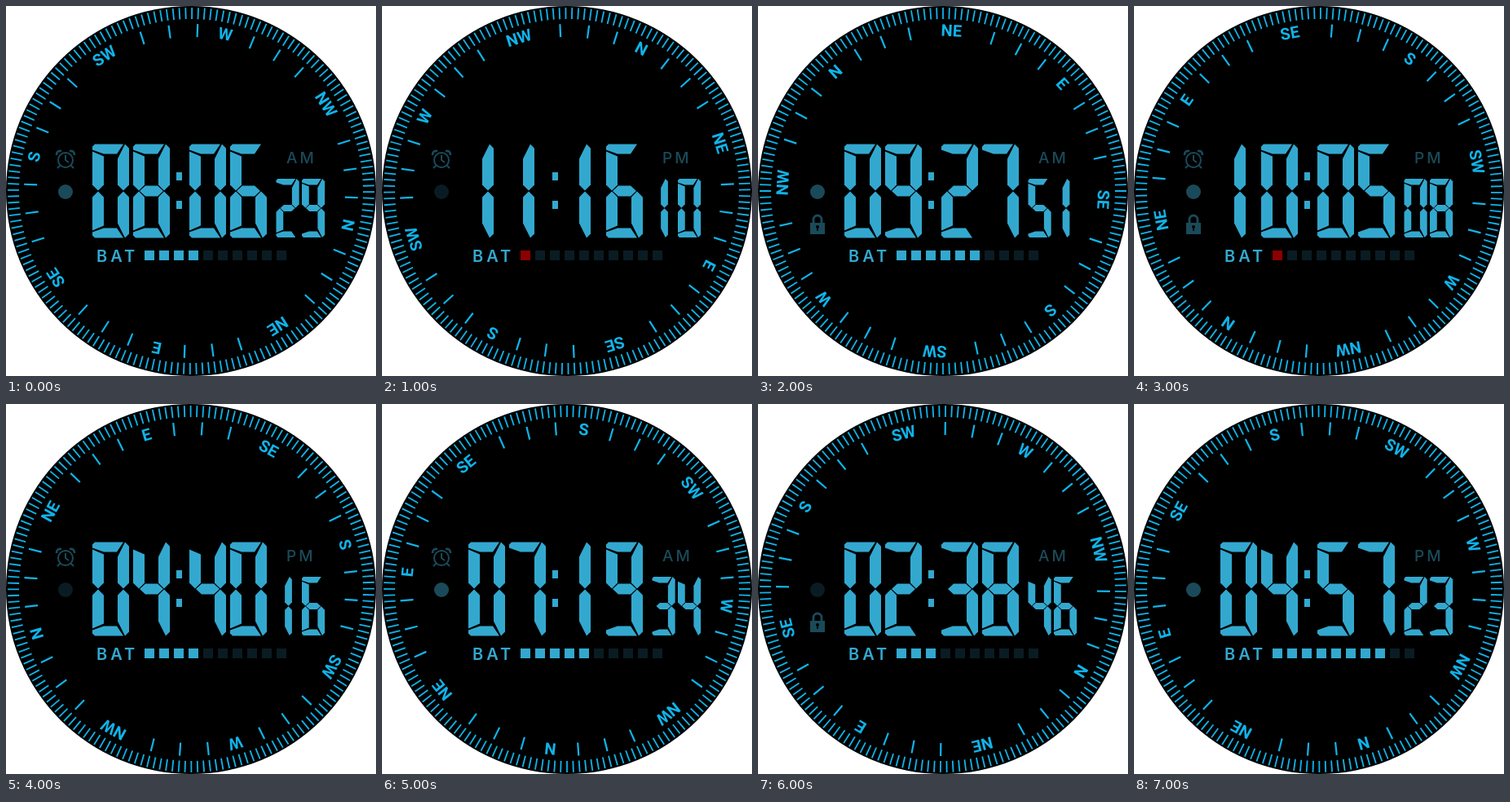
Write an HTML page with a canvas that moves like this. It is 454 by 454 pixels and loops after 8 s.

```html
<!DOCTYPE html>
<html lang="en">
<head>
<meta charset="utf-8">
<title>Digital compass watch</title>
<style>
html, body { margin: 0; height: 100%; overflow: hidden; background: #fff; }
canvas { display: block; }
</style>
</head>
<body>
<canvas id="face" width="454" height="454"></canvas>
<script>
const ctx = document.getElementById('face').getContext('2d');
const CENTER = 227, STEP = 1000;
const DIAL = '#10b4ea', DIGIT = '#33a8cf', DIM = '#0a1c23', ICON = '#1a4a59', RED = '#8b0000';

// One reading per second: time, half of day, north angle, battery, icons
const readings = [
  { time: '080629', half: 'AM', north: 102.3, battery: 4, alarm: 1, radio: 1, lock: 0 },
  { time: '111610', half: 'PM', north: 27.6, battery: 1, alarm: 1, radio: 0, lock: 0 },
  { time: '092751', half: 'AM', north: 318, battery: 6, alarm: 0, radio: 1, lock: 1 },
  { time: '100508', half: 'PM', north: 214.5, battery: 1, alarm: 1, radio: 1, lock: 1 },
  { time: '044016', half: 'PM', north: 253.9, battery: 4, alarm: 1, radio: 0, lock: 0 },
  { time: '071934', half: 'AM', north: 186, battery: 5, alarm: 1, radio: 1, lock: 0 },
  { time: '023846', half: 'AM', north: 120.8, battery: 3, alarm: 0, radio: 0, lock: 1 },
  { time: '045723', half: 'PM', north: 163.9, battery: 8, alarm: 0, radio: 1, lock: 0 }
];

// Segments of a 45 x 115 digit; the lower ones mirror the upper ones
const flip = path => path.replace(/,(\d+)/g, (_, y) => ',' + (115 - y));
const bar = 'M0,7L0,3L3,0L38,0L30,12L14,12Z';
const leftSide = 'M0,9L14,15L14,50L7,57L0,50Z';
const rightSide = 'M40,0L45,5L45,50L38,57L31,50L31,18Z';
const middle = 'M8,57.5L15,51L30,51L37,57.5L30,64L15,64Z';
const segments = {
  a: new Path2D(bar), d: new Path2D(flip(bar)),
  f: new Path2D(leftSide), e: new Path2D(flip(leftSide)),
  b: new Path2D(rightSide), c: new Path2D(flip(rightSide)),
  g: new Path2D(middle)
};
const glyphs = ['abcdef', 'bc', 'abdeg', 'abcdg', 'bcfg', 'acdfg', 'acdefg', 'abc', 'abcdefg', 'abcdfg'];

function digit(value, x, y, scale) {
  ctx.save();
  ctx.translate(x, y);
  ctx.scale(scale, scale);
  if (value === '1') ctx.translate(-14, 0);
  ctx.fillStyle = DIGIT;
  for (const key of glyphs[value]) ctx.fill(segments[key]);
  ctx.restore();
}

function rect(color, x, y, w, h) {
  ctx.fillStyle = color;
  ctx.fillRect(x, y, w, h);
}

function stroke(path, color, width) {
  ctx.strokeStyle = color;
  ctx.lineWidth = width;
  ctx.stroke(new Path2D(path));
}

function disc(color, x, y, r) {
  ctx.fillStyle = color;
  ctx.beginPath();
  ctx.arc(x, y, r, 0, Math.PI * 2);
  ctx.fill();
}

function text(value, x, y, font, color, align, spacing) {
  ctx.font = font;
  ctx.fillStyle = color;
  ctx.textAlign = align;
  ctx.letterSpacing = spacing + 'px';
  ctx.fillText(value, x, y);
}

function around(angle, paint) {
  ctx.save();
  ctx.rotate(angle * Math.PI / 180);
  paint();
  ctx.restore();
}

function dial(north) {
  ctx.save();
  ctx.translate(CENTER, CENTER);
  ctx.rotate(north * Math.PI / 180);
  for (let a = 0; a < 360; a += 2) around(a, () => rect(DIAL, -0.9, -225, 1.8, 14));
  for (let a = 0; a < 360; a += 10) {
    if (![0, 40, 50].includes(a % 90)) around(a, () => rect(DIAL, -1.1, -205, 2.2, 16));
  }
  ['N', 'NE', 'E', 'SE', 'S', 'SW', 'W', 'NW'].forEach((name, i) => around(i * 45, () =>
    text(name, 0, -190, 'bold 20px Roboto, sans-serif', DIAL, 'center', 0)));
  ctx.restore();
}

function alarmIcon() {
  stroke('M82,189a9,9 0 1 1 -18,0a9,9 0 1 1 18,0M73,183V189L77,192M66,196L63,199M80,196L83,199', ICON, 2);
  stroke('M62,183Q62,177 68,178M84,183Q84,177 78,178', ICON, 2.6);
}

function lockIcon() {
  rect(ICON, 64, 266, 18, 14);
  stroke('M68,267V262a5,5 0 0 1 10,0V267', ICON, 2.8);
  disc('#000', 73, 271, 2);
  rect('#000', 72.2, 271, 1.6, 5);
}

function draw({ time, half, north, battery, alarm, radio, lock }) {
  ctx.clearRect(0, 0, 454, 454);
  disc('#000', CENTER, CENTER, 227);
  dial(north);
  [106, 156, 225, 275].forEach((x, i) => digit(time[i], x, 169.5, 1));
  [331.5, 363].forEach((x, i) => digit(time[4 + i], x, 212, 0.626));
  for (const y of [204, 239]) rect(DIGIT, 209, y, 7, 10);
  text(half, 344, 193, '500 19px Inter, sans-serif', ICON, 'left', 3);
  text('BAT', 111, 314, '600 20px Inter, sans-serif', DIGIT, 'left', 4);
  for (let i = 0; i < 10; i++) {
    const lit = battery === 1 ? RED : DIGIT;
    rect(i < battery ? lit : DIM, 170 + i * 18, 300, 12, 12);
  }
  if (alarm) alarmIcon();
  disc(radio ? ICON : DIM, 73, 228, 9);
  if (lock) lockIcon();
}

const start = performance.now();
function tick() {
  const elapsed = performance.now() - start;
  draw(readings[Math.floor(elapsed / STEP) % readings.length]);
  requestAnimationFrame(tick);
}
tick();
</script>
</body>
</html>
```
